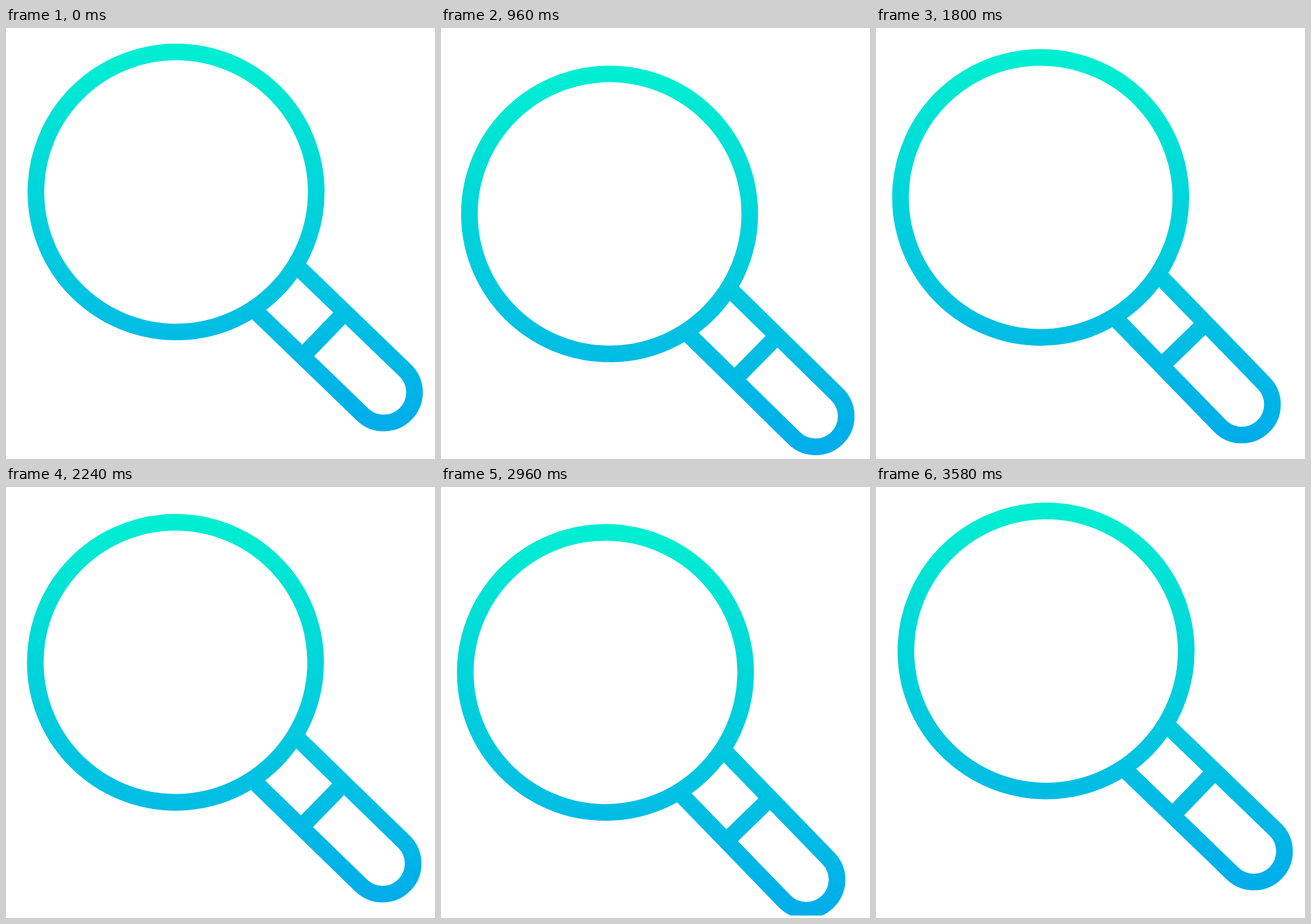
An HTML page that plays this animation: 700 by 704 pixels, repeating every 3.6 s.

```html
<!DOCTYPE html>
<html lang="en">
<head>
<meta charset="utf-8">
<title>Magnifying glass</title>
<style>
  html, body { margin: 0; width: 100%; height: 100%; overflow: hidden; background: #fff; }
  svg { display: block; overflow: hidden; }
</style>
</head>
<body>
<svg width="700" height="700" viewBox="0 0 700 700">
  <defs>
    <linearGradient id="tint" gradientUnits="userSpaceOnUse" x1="277" y1="25" x2="277" y2="659">
      <stop offset="0" stop-color="#00efd1"/>
      <stop offset="1" stop-color="#00acea"/>
    </linearGradient>
    <!-- The glass lies along the x axis, with the lens at the origin. -->
    <mask id="shape" maskUnits="userSpaceOnUse" x="0" y="0" width="720" height="720">
      <g transform="translate(277.5 267.8) rotate(44)" fill="none" stroke="#fff" stroke-width="27.2">
        <circle r="228.7"/>
        <path d="M225 -50H471.3A50 50 0 0 1 471.3 50H225M334.8 -50V50"/>
      </g>
    </mask>
  </defs>
  <g id="glass">
    <rect width="720" height="720" fill="url(#tint)" mask="url(#shape)"/>
  </g>
</svg>
<script>
  const LOOP = 3600;
  const glass = document.getElementById('glass');
  const smooth = u => u * u * (3 - 2 * u);

  // Eases from 0 to 1 during `rise` ms, then back to 0 by the end of `period`.
  function swing(time, rise, period) {
    const t = time % period;
    return t < rise ? smooth(t / rise) : 1 - smooth((t - rise) / (period - rise));
  }

  function draw(now) {
    const t = now % LOOP;
    const drop = 34 * swing(t, 892.5, 1785);
    const tilt = 2 * swing(t, 500, 1190);
    glass.setAttribute('transform', `translate(0 ${drop}) rotate(${tilt})`);
    requestAnimationFrame(draw);
  }
  draw(0);
</script>
</body>
</html>
```
